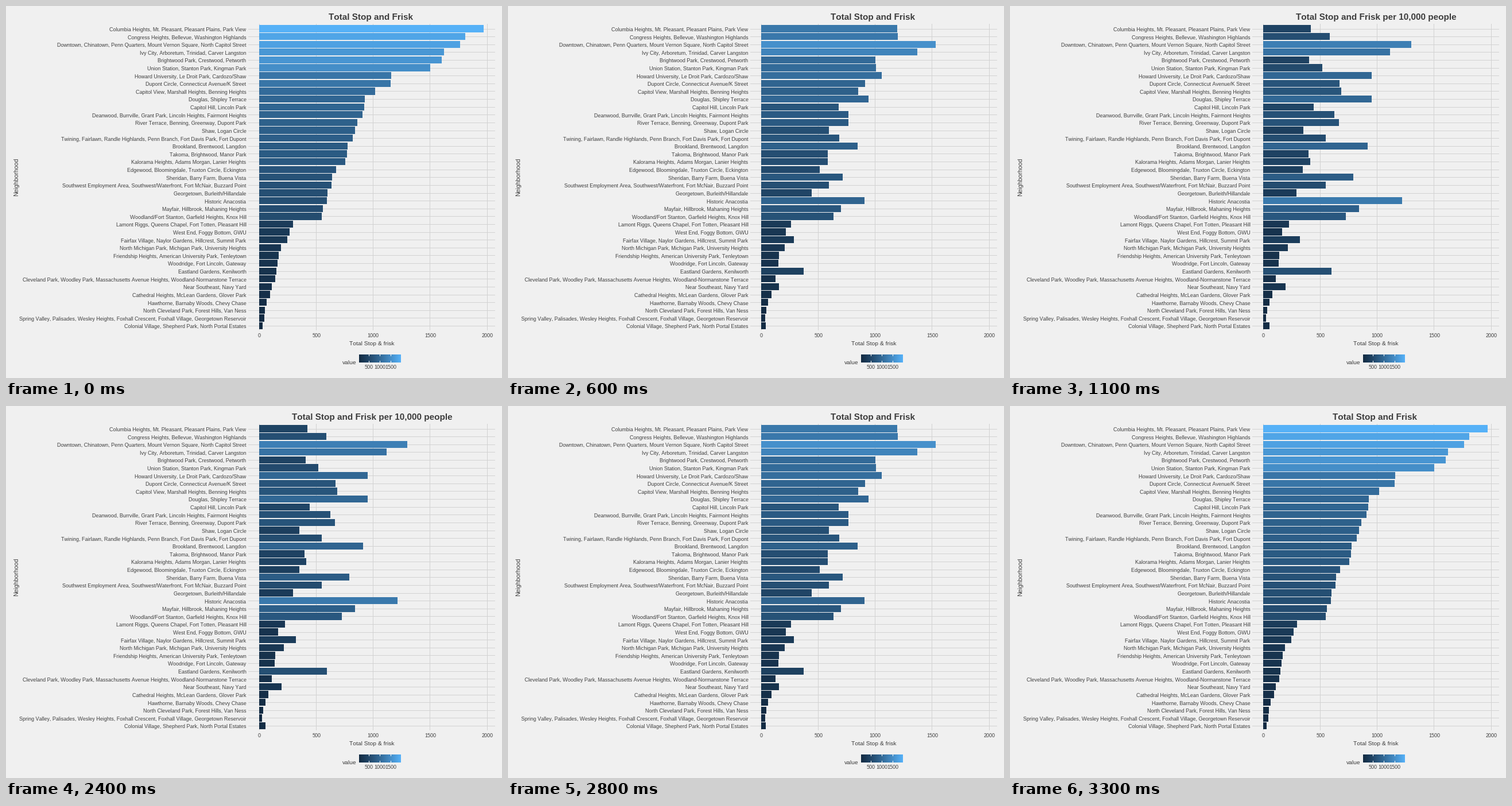
Write a matplotlib script that moves like this. It is 864 by 648 pixels and loops after 3.4 s.

```python
import numpy as np
import matplotlib.pyplot as plt
from matplotlib.animation import FuncAnimation
from matplotlib.patches import Rectangle

plt.rcParams["font.family"] = "Liberation Sans"
plt.rcParams["text.hinting"] = "native"
plt.rcParams["text.kerning_factor"] = 6
plt.rcParams["toolbar"] = "None"

W, H, DPI = 864, 648, 100
FRAMES, STEP = 34, 100
BG, GRID, INK = "#F0F0F0", "#D2D2D2", "#3C3C3C"
X0, UNIT = 441, 0.1983          # pixel of zero, pixels per stop
TOP, PITCH, BAR = 39.5, 13.62, 12.26
LEFT, RIGHT = 422, 852
TITLES = ("Total Stop and Frisk", "Total Stop and Frisk per 10,000 people")

# label, bar end for totals, bar end per 10,000 people (pixels)
ROWS = [
    ("Columbia Heights, Mt. Pleasant, Pleasant Plains, Park View", 832, 523.7),
    ("Congress Heights, Bellevue, Washington Highlands", 800, 557.3),
    ("Downtown, Chinatown, Penn Quarters, Mount Vernon Square, North Capitol Street", 790.5, 698.6),
    ("Ivy City, Arboretum, Trinidad, Carver Langston", 763, 662.3),
    ("Brightwood Park, Crestwood, Petworth", 758.6, 520.7),
    ("Union Station, Stanton Park, Kingman Park", 739, 543.5),
    ("Howard University, Le Droit Park, Cardozo/Shaw", 671, 630.3),
    ("Dupont Circle, Connecticut Avenue/K Street", 670, 573.7),
    ("Capitol View, Marshall Heights, Benning Heights", 643, 577),
    ("Douglas, Shipley Terrace", 625.4, 630.3),
    ("Capitol Hill, Lincoln Park", 623.6, 529),
    ("Deanwood, Burrville, Grant Park, Lincoln Heights, Fairmont Heights", 621, 565),
    ("River Terrace, Benning, Greenway, Dupont Park", 612, 573),
    ("Shaw, Logan Circle", 607.5, 511),
    ("Twining, Fairlawn, Randle Highlands, Penn Branch, Fort Davis Park, Fort Dupont", 604, 550),
    ("Brookland, Brentwood, Langdon", 595, 622.6),
    ("Takoma, Brightwood, Manor Park", 594, 519.7),
    ("Kalorama Heights, Adams Morgan, Lanier Heights", 590.6, 523),
    ("Edgewood, Bloomingdale, Truxton Circle, Eckington", 575.4, 510.3),
    ("Sheridan, Barry Farm, Buena Vista", 568, 598),
    ("Southwest Employment Area, Southwest/Waterfront, Fort McNair, Buzzard Point", 567, 550),
    ("Georgetown, Burleith/Hillandale", 559.6, 499.3),
    ("Historic Anacostia", 558.6, 682.6),
    ("Mayfair, Hillbrook, Mahaning Heights", 552, 608.3),
    ("Woodland/Fort Stanton, Garfield Heights, Knox Hill", 550, 584.7),
    ("Lamont Riggs, Queens Chapel, Fort Totten, Pleasant Hill", 500.4, 486.3),
    ("West End, Foggy Bottom, GWU", 493.6, 474),
    ("Fairfax Village, Naylor Gardens, Hillcrest, Summit Park", 490.4, 504.6),
    ("North Michigan Park, Michigan Park, University Heights", 479, 484.4),
    ("Friendship Heights, American University Park, Tenleytown", 475, 469),
    ("Woodridge, Fort Lincoln, Gateway", 473.2, 468),
    ("Eastland Gardens, Kenilworth", 471, 559.6),
    ("Cleveland Park, Woodley Park, Massachusetts Avenue Heights, Woodland-Normanstone Terrace", 469, 463),
    ("Near Southeast, Navy Yard", 463, 480),
    ("Cathedral Heights, McLean Gardens, Glover Park", 460, 457),
    ("Hawthorne, Barnaby Woods, Chevy Chase", 454, 452.4),
    ("North Cleveland Park, Forest Hills, Van Ness", 451.4, 448),
    ("Spring Valley, Palisades, Wesley Heights, Foxhall Crescent, Foxhall Village, Georgetown Reservoir", 449.6, 446.3),
    ("Colonial Village, Shepherd Park, North Portal Estates", 446.5, 452),
]
TOTAL = np.array([r[1] for r in ROWS], float)
RATE = np.array([r[2] for r in ROWS], float)
LOW, HIGH = RATE.min(), TOTAL.max()

# Colour ramp blended in CIE Lab
TO_XYZ = np.array([[0.4124, 0.3576, 0.1805],
                   [0.2126, 0.7152, 0.0722],
                   [0.0193, 0.1192, 0.9505]])
WHITE = TO_XYZ.sum(axis=1)
TO_LAB = np.array([[0, 116, 0], [500, -500, 0], [0, 200, -200]])


def to_lab(rgb):
    c = np.array(rgb) / 255
    lin = np.where(c > 0.04045, ((c + 0.055) / 1.055) ** 2.4, c / 12.92)
    t = TO_XYZ @ lin / WHITE
    f = np.where(t > 0.008856, np.cbrt(t), 7.787 * t + 16 / 116)
    return TO_LAB @ f


def to_rgb(lab):
    f = np.linalg.solve(TO_LAB.astype(float), lab)
    t = np.where(f > 0.2069, f ** 3, (f - 16 / 116) / 7.787)
    lin = np.clip(np.linalg.solve(TO_XYZ, t * WHITE), 0, 1)
    c = np.where(lin > 0.0031308, 1.055 * lin ** (1 / 2.4) - 0.055, 12.92 * lin)
    return np.clip(c, 0, 1)


DARK, LIGHT = to_lab((19, 43, 67)), to_lab((86, 177, 247))


def ramp(u):
    return to_rgb(DARK + (LIGHT - DARK) * np.clip(u, 0, 1))


def shade(end):
    return ramp((end - LOW) / (HIGH - LOW))


fig = plt.figure(figsize=(W / DPI, H / DPI), dpi=DPI, facecolor=BG)
ax = fig.add_axes([0, 0, 1, 1])
ax.set_xlim(0, W)
ax.set_ylim(H, 0)
ax.axis("off")


def box(x, y, w, h, color, z=1):
    return ax.add_patch(Rectangle((x, y), w, h, fc=color, lw=0,
                                  antialiased=False, zorder=z))


def label(x, y, s, px, ha="center", **kw):
    return ax.text(x, y, s, fontsize=px * 72 / DPI, color=INK, ha=ha,
                   va="baseline", **kw)


centers = TOP + PITCH * np.arange(len(ROWS))
for c, row in zip(centers, ROWS):
    box(LEFT, np.floor(c + 0.5), RIGHT - LEFT, 1, GRID)
    label(418.5, np.round(c + 4.4), row[0], 8.95, ha="right")
for v in range(0, 2001, 500):
    x = X0 + v * UNIT
    box(np.round(x), 31, 1, 534, GRID)
    label(x + 0.5, 577, str(v), 9)

label(637, 591, "Total Stop & frisk", 10.2)
label(21, 298, "Neighborhood", 10.6, rotation=90, rotation_mode="anchor")

# Legend
label(586, 624, "value", 10.3, ha="left")
ramp_row = np.array([[ramp(u) for u in np.linspace(0, 1, 73)]])
ax.imshow(ramp_row, extent=(615, 688, 621, 607), aspect="auto",
          interpolation="nearest", zorder=2)
ax.set_xlim(0, W)
ax.set_ylim(H, 0)
for v, x in ((500, 632), (1000, 651), (1500, 670)):
    box(x, 607, 1, 3, "white", 3)
    box(x, 618, 1, 3, "white", 3)
    label(x, 632, str(v), 9)

bars = [box(X0, c - BAR / 2, 1, BAR, BG, 2) for c in centers]
title = label(636.5, 24, TITLES[0], 15.2, weight="bold")


def ease(p):
    p = min(max(p, 0), 1)
    return 4 * p ** 3 if p < 0.5 else 1 - 4 * (1 - p) ** 3


def draw(i):
    mix = ease((i - 1) / 10) - ease((i - 23) / 10)
    for bar, end in zip(bars, TOTAL + (RATE - TOTAL) * mix):
        bar.set_width(end - X0)
        bar.set_facecolor(shade(end))
    title.set_text(TITLES[7 <= i < 28])
    title.set_x(637.5 if 7 <= i < 28 else 635.5)
    return bars + [title]


anim = FuncAnimation(fig, draw, frames=FRAMES, interval=STEP, repeat=True,
                     repeat_delay=0, blit=False)
plt.show()
```
